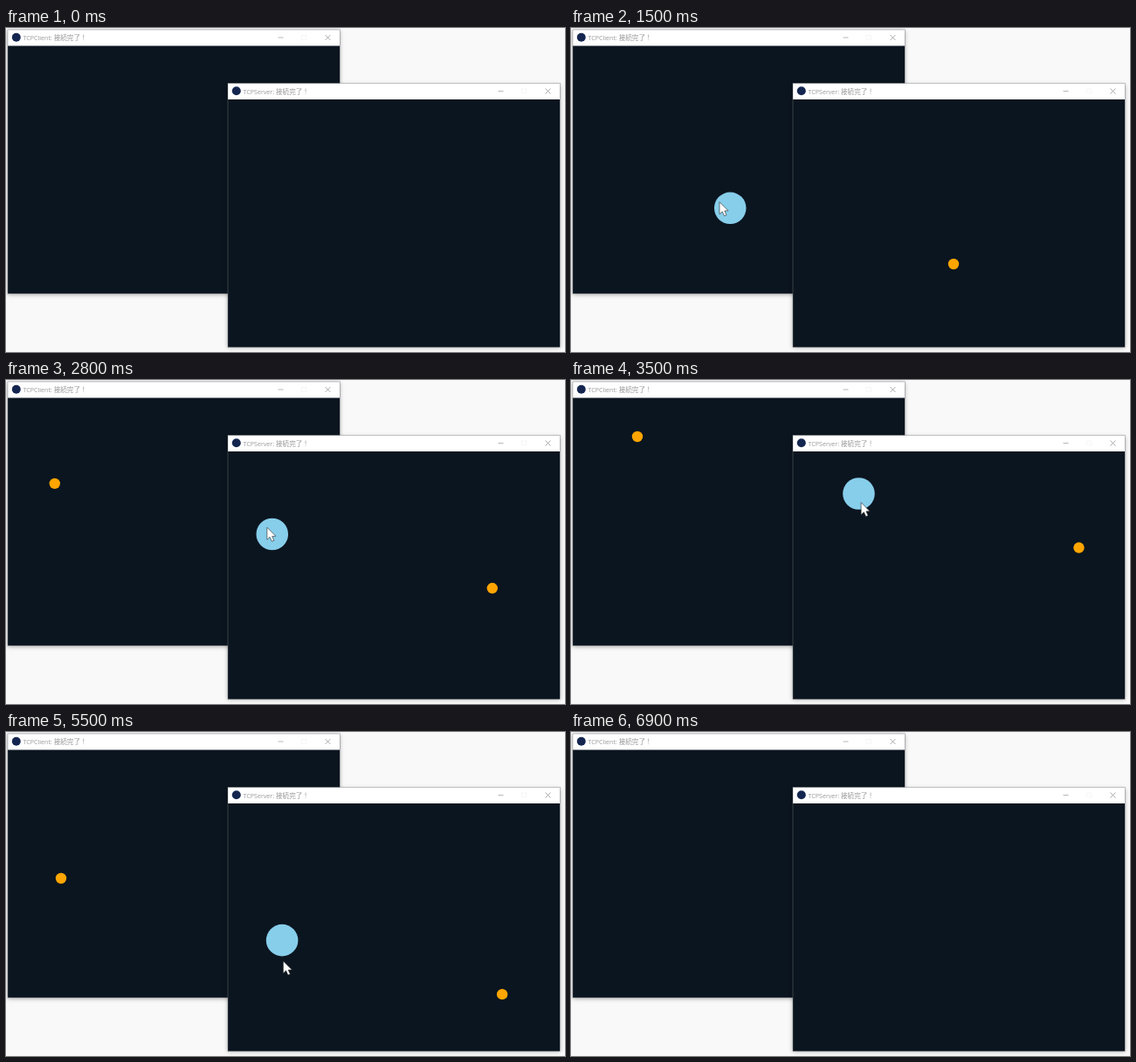
These frames come from a looping animation (640x372 px, 7.9 s). An HTML page with a canvas:

```html
<!DOCTYPE html>
<html lang="ja">
<head>
<meta charset="utf-8">
<title>TCP pointer sharing</title>
<style>
  html, body { margin: 0; height: 100%; overflow: hidden; background: #f9f9f9; }
  canvas { display: block; width: 640px; height: 372px; }
</style>
</head>
<body>
<canvas id="stage" width="640" height="372"></canvas>
<script>
const ctx = document.getElementById('stage').getContext('2d');
const LOOP = 7900, STEP = 100, START = 500, END = 6900;
const BLUE_LEAD = 18, CURSOR_LEAD = 55; // ms ahead of the networked dot
const WIDTH = 380, HEIGHT = 302.5, BAR = 18;
const client = { x: 2.5, y: 2.5, title: 'TCPClient: ' };
const server = { x: 254.5, y: 64, title: 'TCPServer: ' };
const DX = 252, DY = 62; // server window relative to client window

// The pointer rests: [from, until]
const pauses = [[1100, 1300], [3900, 4100], [4800, 5100], [5700, 6100], [6500, 6700]];

// Turning points of the pointer: [ms, x, y]
const route = [
  [500, 628, 101], [1100, 228, 217], [1500, 186, 209], [1700, 135, 160],
  [1900, 260, 114], [2100, 391, 173], [2300, 398, 246], [2500, 360, 239],
  [3100, 274, 128], [3500, 328, 127], [3900, 342, 262], [4400, 338, 151],
  [4600, 226, 135], [4800, 115, 144], [5100, 130, 148], [5300, 296, 158],
  [5500, 315, 230], [5600, 318, 282], [6100, 322, 294], [6500, 618, 157],
  [6800, 625, 98]
];

function slope(i, axis) {
  const a = route[Math.max(i - 1, 0)], b = route[Math.min(i + 1, route.length - 1)];
  return (b[axis] - a[axis]) / (b[0] - a[0]);
}

// Smooth cubic curve through the turning points
function pointAt(t) {
  let i = 0;
  while (i < route.length - 2 && t >= route[i + 1][0]) i++;
  const a = route[i], b = route[i + 1], span = b[0] - a[0];
  const u = Math.min(1, (t - a[0]) / span), v = 1 - u;
  const along = axis =>
    v * v * (1 + 2 * u) * a[axis] + u * u * (3 - 2 * u) * b[axis] +
    u * v * span * (v * slope(i, axis) - u * slope(i + 1, axis));
  return { x: along(1), y: along(2) };
}

function contains(win, p) {
  return p.x >= win.x && p.x <= win.x + WIDTH &&
         p.y >= win.y + BAR && p.y <= win.y + HEIGHT;
}

function line(color, x1, y1, x2, y2) {
  ctx.strokeStyle = color;
  ctx.lineWidth = 0.7;
  ctx.beginPath();
  ctx.moveTo(x1, y1);
  ctx.lineTo(x2, y2);
  ctx.stroke();
}

function disc({ x, y, r, color }) {
  ctx.fillStyle = color;
  ctx.beginPath();
  ctx.arc(x, y, r, 0, Math.PI * 2);
  ctx.fill();
}

function drawTitle(text) {
  ctx.fillStyle = '#999';
  ctx.font = '7.1px "Open Sans", sans-serif';
  ctx.fillText(text, 17, 11.5);
  const end = 17 + ctx.measureText(text).width;
  ctx.font = '7.6px "Noto Sans CJK JP", "Noto Sans CJK", sans-serif';
  ctx.fillText('接続完了！', end, 11.5);
}

function drawWindow(win, dots) {
  ctx.save();
  ctx.translate(win.x, win.y);
  ctx.save();
  ctx.shadowColor = 'rgba(0,0,0,.35)';
  ctx.shadowBlur = 5;
  ctx.shadowOffsetY = 1;
  ctx.fillStyle = '#fff';
  ctx.fillRect(-0.5, -0.5, WIDTH, HEIGHT);
  ctx.restore();
  ctx.fillStyle = '#0b151f';
  ctx.fillRect(-0.5, BAR, WIDTH, HEIGHT - BAR);
  ctx.strokeStyle = 'rgba(120,124,130,.55)';
  ctx.lineWidth = 0.8;
  ctx.strokeRect(-0.5, -0.5, WIDTH + 0.5, HEIGHT + 0.5);

  disc({ x: 9.3, y: 8.3, r: 5, color: '#14264f' });
  drawTitle(win.title);
  line('#999', 309, 8.5, 315, 8.5);
  ctx.strokeStyle = '#f2f2f2';
  ctx.strokeRect(336, 6, 5, 5);
  line('#888', 363, 5.5, 369, 11.5);
  line('#888', 369, 5.5, 363, 11.5);
  ctx.restore();

  ctx.save();
  ctx.beginPath();
  ctx.rect(win.x - 0.5, win.y + BAR, WIDTH, HEIGHT - BAR);
  ctx.clip();
  dots.forEach(disc);
  ctx.restore();
}

const arrow = new Path2D('M0 0V14L3.2 11L5.5 16L8 15L5.8 10.2L10 10Z');

function drawCursor({ x, y }) {
  ctx.save();
  ctx.translate(x, y);
  ctx.fillStyle = '#fff';
  ctx.fill(arrow);
  ctx.strokeStyle = '#222';
  ctx.lineWidth = 0.6;
  ctx.stroke(arrow);
  ctx.restore();
}

function draw(time) {
  let t = Math.floor(time / STEP) * STEP;
  const pause = pauses.find(([from, until]) => t >= from && t < until);
  if (pause) t = pause[0];

  const clientDots = [], serverDots = [];
  const active = t >= START && t < END;
  const cursor = pointAt(t + CURSOR_LEAD);
  if (active) {
    const late = pointAt(t), blue = pointAt(t + BLUE_LEAD);
    const local = { ...blue, r: 18.3, color: '#87ceeb' };
    const remote = (p, sign) =>
      ({ x: p.x + sign * DX, y: p.y + sign * DY, r: 6.2, color: '#ffa500' });
    const inServer = contains(server, cursor);
    if (contains(client, cursor)) {
      clientDots.push(local);
      serverDots.push(remote(inServer ? blue : late, 1));
    }
    if (inServer) {
      serverDots.push(local);
      clientDots.push(remote(late, -1));
    }
  }

  ctx.fillStyle = '#f9f9f9';
  ctx.fillRect(0, 0, 640, 372);
  drawWindow(client, clientDots);
  drawWindow(server, serverDots);
  if (active) drawCursor(cursor);
}

const startTime = performance.now();
function frame() {
  draw((performance.now() - startTime) % LOOP);
  requestAnimationFrame(frame);
}
frame();
</script>
</body>
</html>
```
